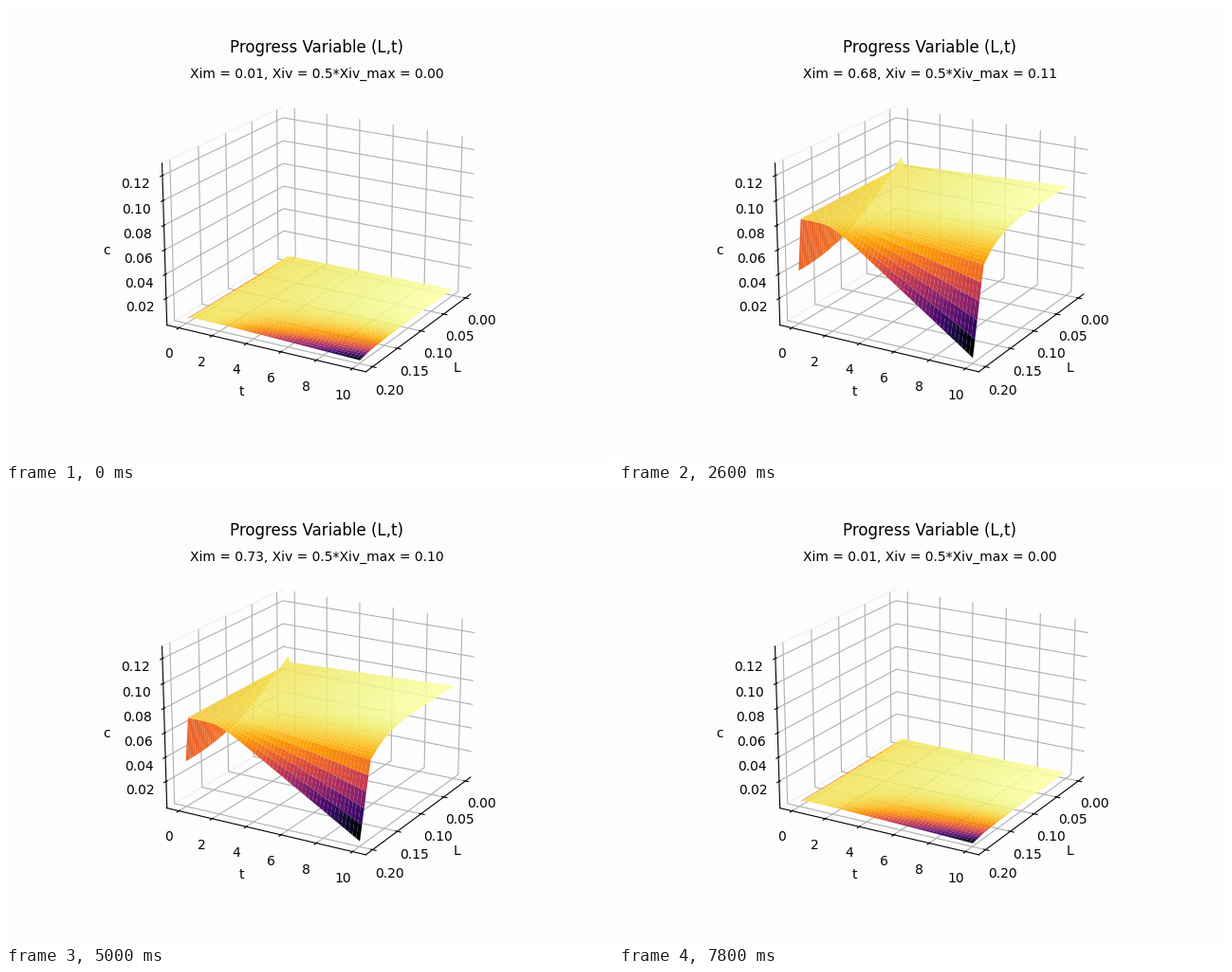
These frames come from a looping animation (640 px wide and 480 px high, 8 s). A matplotlib script:

```python
import numpy as np
import matplotlib.pyplot as plt
from matplotlib.animation import FuncAnimation

STEPS = 20          # mixture values per sweep; the loop runs up and back down
N = 50              # surface samples per axis
BG = "#fdfdfd"
L_MIN, L_MAX = 0.002, 0.199

means = np.linspace(0.01, 0.99, STEPS)
U, T = np.meshgrid(np.linspace(0, 1, N), np.linspace(0, 10, N), indexing="ij")
L = L_MIN + (L_MAX - L_MIN) * U


def padded(lo, hi, *margins):
    for m in margins:
        d = (hi - lo) * m
        lo, hi = lo - d, hi + d
    return lo, hi


def peak(xi):
    """Plateau height for a mean mixture fraction."""
    gain = 0.71 - 0.422 * xi - 0.1 * xi ** 8
    return gain * (1 - 0.63 * np.exp(-xi / 0.05)) * xi * (1 - xi)


def progress(xi):
    """Progress variable c(L, t): a rising plateau minus a loss at large L."""
    drop = 0.46 - 0.34 * xi
    loss = np.where(U < 0.9,
                    drop * (U / 0.9) ** 5.5,
                    drop + (0.977 - drop) * (U - 0.9) / 0.1)
    late = T - 1.95
    ramp = (late + np.hypot(late, 0.6)) / 16.1      # soft knee, then linear
    c = 0.929 + 0.0071 * T - loss * ramp
    c[:, 0] = 0.455 + 0.545 * (1 - U[:, 0]) ** 2.1  # initial state
    return peak(xi) * c


fig = plt.figure(figsize=(6.4, 4.8), dpi=100, facecolor=BG)
ax = fig.add_subplot(projection="3d", facecolor=BG)
ax.view_init(elev=20, azim=30)
ax.set_title("Progress Variable (L,t)")
ax.set_xlabel("L")
ax.set_ylabel("t")
ax.set_zlabel("c")
ax.set_xticks(np.arange(5) * 0.05)
ax.set_yticks(np.arange(0, 11, 2))
ax.set_zticks(np.arange(1, 7) * 0.02)
ax.set_xlim(*padded(L_MIN, L_MAX, 0.05, 1 / 48))
ax.set_ylim(*padded(0, 10, 0.05, 1 / 48))
ax.set_zlim(*padded(0.0003, 0.127, 1 / 48))
for axis in (ax.xaxis, ax.yaxis, ax.zaxis):
    axis.pane.fill = False
for axis in (ax.xaxis, ax.zaxis):
    axis.pane.set_edgecolor("none")

caption = ax.text2D(0.5, 0.95, "", transform=ax.transAxes, ha="center")
surface = None


def update(i):
    global surface
    xi = means[min(i, 2 * STEPS - 1 - i)]
    if surface is not None:
        surface.remove()
    surface = ax.plot_surface(L, T, progress(xi), cmap="inferno")
    caption.set_text(f"Xim = {xi:.2f}, Xiv = 0.5*Xiv_max = {0.5 * xi * (1 - xi):.2f}")
    return surface, caption


anim = FuncAnimation(fig, update, frames=2 * STEPS, interval=200,
                     init_func=lambda: update(0), repeat=True, repeat_delay=0)
plt.show()
```
